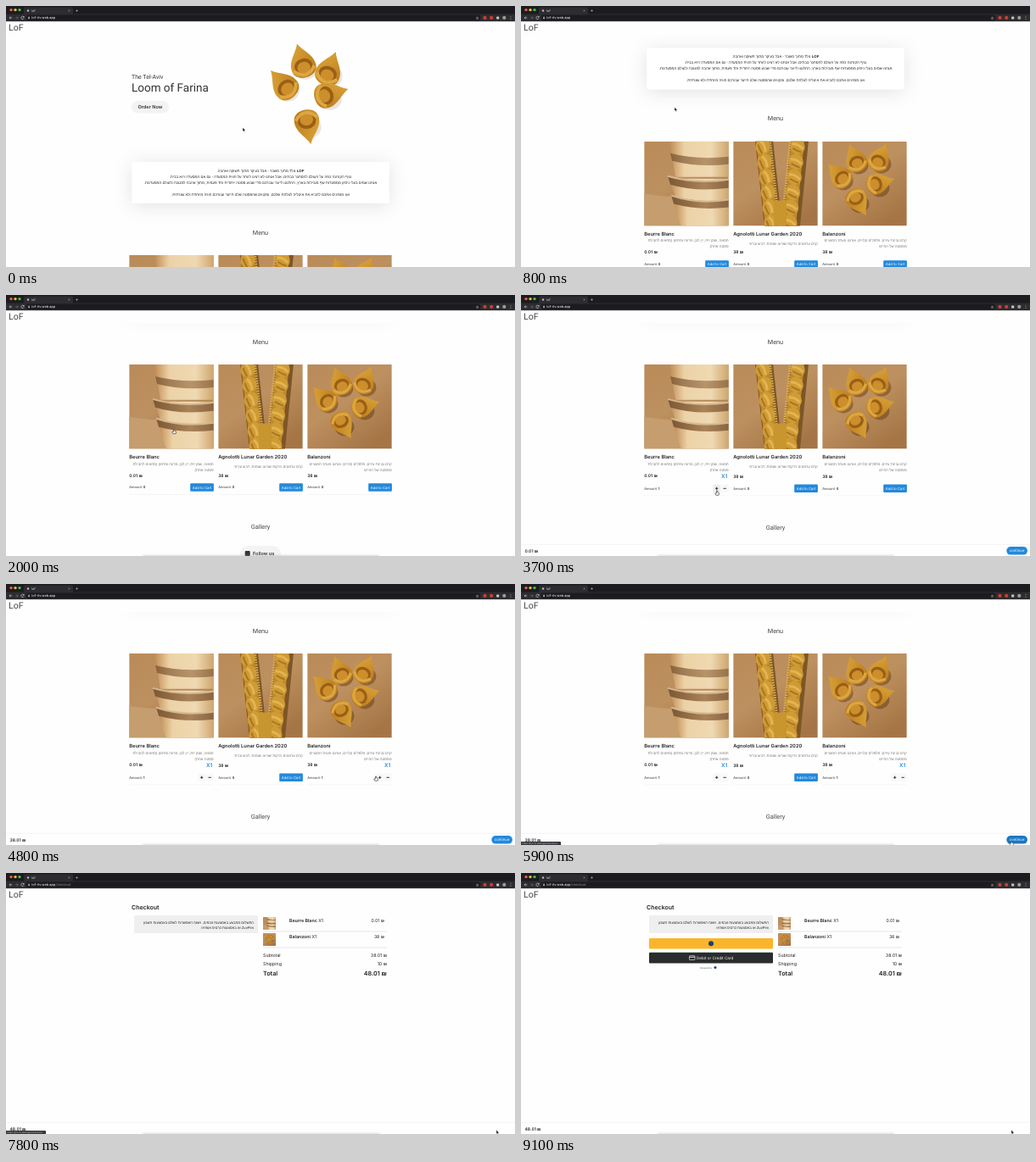
An HTML page that plays this animation: 600x308 px, repeating every 9200 ms.

```html
<!DOCTYPE html>
<html lang="en">
<head>
<meta charset="utf-8">
<title>lof</title>
<style>
html, body { margin: 0; width: 100%; height: 100%; overflow: hidden; background: #fefefe; }
svg { display: block; }
text { font-family: Inter, "Liberation Sans", sans-serif; fill: #222; white-space: pre; text-rendering: geometricPrecision; }
.r { font-family: Roboto, sans-serif; }
.b { font-weight: 600; }
.w { fill: #fff; }
.g { fill: #777; }
.m { text-anchor: middle; }
.e { text-anchor: end; }
.h { font-family: "Liberation Sans", sans-serif; direction: rtl; }
</style>
</head>
<body>
<svg id="stage" width="600" height="308" viewBox="0 0 600 308">
  <defs>
    <linearGradient id="wood" x2=".7" y2="1"><stop stop-color="#b98b58"/><stop offset=".5" stop-color="#bd9060"/><stop offset="1" stop-color="#a57545"/></linearGradient>
    <linearGradient id="cream"><stop stop-color="#c08c54"/><stop offset=".25" stop-color="#ecd2a6"/><stop offset=".7" stop-color="#efd9b2"/><stop offset="1" stop-color="#cfa56e"/></linearGradient>
    <linearGradient id="gap"><stop stop-color="#7d5734"/><stop offset=".6" stop-color="#a98258"/><stop offset="1" stop-color="#8a6540"/></linearGradient>
    <linearGradient id="dough" y2="1"><stop stop-color="#e0aa3f"/><stop offset="1" stop-color="#b87818"/></linearGradient>
    <filter id="soft" x="-20%" y="-80%" width="140%" height="300%"><feDropShadow dx="0" dy="3" stdDeviation="11" flood-opacity=".11"/></filter>
    <filter id="blur" x="-5%" y="-200%" width="110%" height="500%"><feGaussianBlur stdDeviation="1.2"/></filter>
    <g id="piece">
      <path d="M0-26C4-16 16-8 15 4C15 12 8 16 0 16C-8 16-15 12-15 4C-16-8-4-16 0-26Z" fill="url(#dough)"/>
      <ellipse cy="2" rx="11" ry="9" fill="#9a5f16"/>
      <ellipse cy="4" rx="8" ry="7" fill="#cd8f2c"/>
      <path d="M-13 5Q0 20 13 5" fill="none" stroke="#dca742" stroke-width="4"/>
    </g>
    <g id="dish"></g>
    <symbol id="tubs" viewBox="0 0 100 100">
      <rect width="100" height="100" fill="url(#wood)"/>
      <path d="M0 62Q50 70 100 62V100H0Z" fill="#c59d6e"/>
      <path d="M30 0H100V42H37Z" fill="url(#cream)"/>
      <path d="M31 14Q62 22 100 18V27Q64 31 33 23Z" fill="url(#gap)" opacity=".8"/>
      <path d="M30 44H100V72Q62 76 37 66Z" fill="url(#cream)"/>
      <path d="M35 70H100V100H44Q38 88 35 70Z" fill="url(#cream)"/>
      <path d="M28 41Q60 50 100 46V55Q60 60 31 51Z" fill="url(#gap)"/>
      <path d="M28 41Q62 51 100 45" fill="none" stroke="#d3b891" stroke-width="2"/>
      <path d="M32 64Q64 74 100 69V78Q64 82 35 74Z" fill="url(#gap)"/>
      <path d="M32 64Q64 75 100 69" fill="none" stroke="#d3b891" stroke-width="2"/>
    </symbol>
    <symbol id="strips" viewBox="0 0 100 100"></symbol>
    <symbol id="plate" viewBox="0 0 100 100"></symbol>
  </defs>
  <rect width="600" height="308" fill="#fefefe"/>
  <g id="shop"></g>
  <g id="checkout"></g>
  <g id="bar"></g>
  <rect id="dock" x="161" y="307" width="279" height="4" fill="#999" filter="url(#blur)"/>
  <g id="status"></g>
  <g id="chrome"></g>
  <g id="arrow"><path d="M0 0V4.6L1.1 3.6L1.9 5.3L2.6 5L1.9 3.4H3.3Z" fill="#111" stroke="#fff" stroke-width=".35"/></g>
  <g id="hand"><path d="M-.6 0Q0-.7.6 0V1.8L2.3 2.3Q2.8 3 2.1 5.2H-1.2L-2.3 3Q-1.8 2.3-.6 3Z" fill="#fff" stroke="#222" stroke-width=".6"/></g>
</svg>
<script>
const LOOP = 9200, BLUE = '#2389dc';
const ADD_A = 3200, ADD_B = 4700, HOVER = 5700, PAGE = 6900, PAY = 8500;
const $ = id => document.getElementById(id);

// y is the vertical middle of the line
const text = (x, y, s, size, cls = '', fill = '') =>
  `<text x="${x}" y="${y + size * .36}" font-size="${size}" class="${cls}"${fill && ` style="fill:${fill}"`}>${s}</text>`;
const rect = (x, y, w, h, fill, rx = 0, more = '') =>
  `<rect x="${x}" y="${y}" width="${w}" height="${h}" rx="${rx}" fill="${fill}" ${more}/>`;
const dot = (x, y, r, fill) => `<circle cx="${x}" cy="${y}" r="${r}" fill="${fill}"/>`;
const line = (d, color, w = .7) => `<path d="${d}" fill="none" stroke="${color}" stroke-width="${w}"/>`;
const photo = (id, x, y, size) => `<use href="#${id}" x="${x}" y="${y}" width="${size}" height="${size}"/>`;
const smooth = u => (u = Math.min(1, Math.max(0, u)), u * u * (3 - 2 * u));

// Redraw a group only when its markup changes
const last = {};
function put(id, html) {
  if (last[id] !== html) $(id).innerHTML = last[id] = html;
}

// Pasta pieces: x, y, angle
const pieces = (list, size, shade) => list.map(([x, y, a]) =>
  `<ellipse cx="${x + 3}" cy="${y + 5}" rx="${14 * size}" ry="${13 * size}" fill="#5a330c" opacity="${shade}"/>` +
  `<use href="#piece" transform="translate(${x} ${y}) rotate(${a}) scale(${size})"/>`).join('');
put('dish', pieces([[350, 69, -16], [380, 78, 20], [329, 95, -42], [379, 105, 74], [355, 138, 170]], .98, .12));
put('plate', rect(0, 0, 100, 100, 'url(#wood)') +
  pieces([[40, 23, -22], [67, 22, 25], [22, 42, -45], [65, 50, 74], [41, 69, 150]], .82, .45));

function strip(x0, x1, side) {
  let s = line(`M${x0 + 2} -5L${x1 + 2} 105`, '#7d5626', 21) + line(`M${x0} -5L${x1} 105`, '#bd8a2a', 15) +
    `<path d="M${x0 + side * 9} -5L${x1 + side * 9} 105" stroke="#dcb050" stroke-width="3" stroke-dasharray="1.6 1.4"/>`;
  for (let i = 0; i < 6; i++) {
    const x = x0 + (x1 - x0) * (i + .5) / 6, y = 6 + i * 18;
    s += `<g transform="translate(${x} ${y}) rotate(${side * 20})"><ellipse rx="8.5" ry="9.5" fill="#cf9b35"/>` +
      line('M-5-5Q2-3 5 5', '#e2b552', 3) + line('M-6 0Q-2 5 2 8', '#a87522', 2) + '</g>';
  }
  return s;
}
put('strips', rect(0, 0, 100, 100, 'url(#wood)') + strip(34, 46, 1) + strip(77, 66, -1) +
  rect(48, 70, 15, 30, '#c8952f'));

const hero = `<g transform="translate(0 -212)">` +
  text(148, 83.5, 'The Tel-Aviv', 7, 'r', '#333') +
  text(148, 96.5, 'Loom of Farina', 13.5, 'r', '#333') +
  rect(148, 112, 44, 14.5, '#f3f3f3', 7.2) + text(170, 119.3, 'Order Now', 5.6, 'b m', '#333') +
  '<use href="#dish"/>' + rect(148.5, 184, 303, 48.5, '#fff', 2, 'filter="url(#soft)"') +
  [[194, '<tspan font-weight="700">LOF</tspan> נולד מתוך משבר - אבל בעיקר מתוך תשוקה ואהבה.'],
   [201, 'נגיף הקורונה כפה על העולם להסתגר בבתים, אבל אנחנו לא רצינו לוותר על חווית המסעדה - גם אם המסעדה היא בבית.'],
   [208, 'אנחנו שמים בעלי ניסיון ממסעדות שף מובילות בארץ, החלטנו לייצר עבורכם מדי שבוע פסטה ייחודית וחד פעמית, מתוך אהבה למטבח ולעולם המסעדנות.'],
   [222, 'אנו מזמינים אתכם להביא את איטליה לצלחת שלכם, ומקווים שהפסטה שלנו תייצר עבורכם חוויה מיוחדת ולא שגרתית.']]
    .map(([y, s]) => text(300, y, s, 4.35, 'h m')).join('') + '</g>';

const items = [
  ['tubs', 'Beurre Blanc', '0.01 ₪', ['חמאה, שמן זית, יין לבן, פרווה ופרמזן (מתאים לחבילת', 'פסטה אחת)']],
  ['strips', 'Agnolotti Lunar Garden 2020', '38 ₪', ['קרם ערמונים וירקות שורש, שומות, דבש וברוזי']],
  ['plate', 'Balanzoni', '38 ₪', ['קרם גבינת עיזים, פלפלים קלויים, אורגנו וזעתר חמוציים', 'מפסטה של החיים']]
];

function card([id, name, price, lines], i, added, grown, plusHover) {
  const x = 145.2 + i * 105, right = x + 99.5, y = grown ? 228.3 : 227;
  let s = photo(id, x, 82, 99.6) + text(x, 191.3, name, 5.8, 'b') +
    lines.map((l, k) => text(right, (lines.length > 1 ? 199 : 202.5) + k * 7, l, 4.3, 'h g')).join('') +
    text(x, grown && !added ? 214.5 : 212.8, price, 5, 'b') + line(`M${x} ${y + 8.5}H${right}`, '#f0f0f0', .6) +
    text(x, y, 'Amount:', 4, '', '#333') + text(x + 16.5, y, +added, 4, 'b');
  if (added) {
    s += text(right - 1.5, 213.8, 'X1', 6.3, 'b e', BLUE) +
      rect(right - 18.5, y - 4.5, 9, 9, plusHover ? '#eee' : '#f8f8f8', 1) + rect(right - 9, y - 4.5, 9, 9, '#f8f8f8', 1) +
      line(`M${right - 15.6} ${y}h3.2m-1.6-1.6v3.2M${right - 6.2} ${y}h3.4`, '#222', .9);
  } else {
    s += rect(right - 27.5, y - 4.7, 27.7, 9.4, BLUE, 1) + text(right - 13.6, y, 'Add to Cart', 4.2, 'm w');
  }
  return s;
}

const shop = (a, b, plusHover) => hero + text(300, 55, 'Menu', 7.3, 'r m', '#444') +
  items.map((it, i) => card(it, i, [a, false, b][i], a, plusHover && !i)).join('') +
  text(300, a ? 274.5 : 273, 'Gallery', 7.3, 'r m', '#444') +
  rect(276, 296, 48, 18, '#f3f3f3', 9) + rect(281.7, 302, 6, 6, '#333', 1) + text(291, 305, 'Follow us', 5.6, 'b', '#333');

const row = (y, label, value, size, cls = '') =>
  text(303, y, label, size, cls) + text(449, y, value, size, cls + ' e');
const thumb = (y, id, name, price) => photo(id, 303, y, 15) +
  text(334, y + 4.2, `<tspan font-weight="600">${name}</tspan> X1`, 5.3) +
  text(446, y + 4.2, price, 5.2, 'e') + line(`M303 ${y + 17}H449`, '#ccc', .5);

const checkout = pay => rect(0, 18, 600, 290, '#fefefe') + text(148, 40.5, 'Checkout', 7, 'b') +
  rect(151, 50, 146, 21, '#efefef', 1) +
  text(292, 58, 'התשלום מתבצע באמצעות זובפים, וישנה האפשרות לשלם באמצעות חשבון', 4.2, 'h') +
  text(292, 64.3, 'ZuvPim או באמצעות כרטיס אשראי.', 4.2, 'h') +
  thumb(52, 'tubs', 'Beurre Blanc', '0.01 ₪') + thumb(71, 'plate', 'Balanzoni', '38 ₪') +
  row(97.3, 'Subtotal', '38.01 ₪', 5.3) + row(107.2, 'Shipping', '10 ₪', 5.3) + row(118, 'Total', '48.01 ₪', 7.2, 'b') +
  (pay ? rect(151, 77, 146, 12.6, '#fbb52b', 1) + dot(224, 83.3, 3, '#1b3f80') +
    rect(151, 93.8, 146, 12.6, '#2b2c2e', 1) +
    rect(198.5, 97.7, 6.5, 4.8, 'none', .6, 'stroke="#fff" stroke-width=".6"') + line('M198.5 99.3h6.5', '#fff', .8) +
    text(207, 100.1, 'Debit or Credit Card', 4.6, 'w') +
    text(211, 111.6, 'Powered by', 2.5, '', '#555') + dot(229, 111.6, 1.5, '#1b3f80') : '');

const bar = (total, fade, hover) => rect(0, 294, 600, 14, '#fefefe') + line('M0 294.3H600', '#e9e9e9', .6) +
  text(4.5, 302, total, 5, 'b') +
  `<g opacity="${fade}">` + rect(572.3, 297, 24.7, 9.6, hover ? '#1b77c6' : BLUE, 4.8) +
  text(584.6, 301.8, 'continue', 4.3, 'm w') + '</g>';

const chrome = path => rect(0, 18, 600, 15.5, '#fefefe') + text(3, 25.5, 'LoF', 10.5, 'r', '#444') +
  rect(0, 0, 600, 10, '#1c1c20') + rect(0, 9.5, 600, 8.7, '#2c2c31') + rect(21, 1.5, 58, 9, '#2c2c31', 1.5) +
  dot(6, 4.6, 1.7, '#f25e57') + dot(11, 4.6, 1.7, '#f5bd2f') + dot(16, 4.6, 1.7, '#3fc74a') +
  dot(26, 5.5, 1.2, '#bbb') + text(30, 5.5, 'lof', 3.9, '', '#ddd') +
  line('M73.6 4.6l1.8 1.8m0-1.8l-1.8 1.8M82 5.5h3m-1.5-1.5v3', '#bbb', .5) +
  rect(23.5, 10.6, 536, 6.6, '#1c1c20', 3.3) +
  line('M7.3 13.9H4m1.5-1.5L4 13.9l1.5 1.5', '#ddd', .6) +
  line('M11 13.9h3.3m-1.5-1.5l1.5 1.5l-1.5 1.5', '#77787c', .6) +
  line('M21 13a1.7 1.7 0 1 0 .1 1.5M21.2 12v1.3h-1.3', '#ddd', .6) +
  rect(26, 13.4, 2, 1.7, '#aaa') + line('M26.4 13.4v-.5a.6.6 0 0 1 1.2 0v.5', '#aaa', .4) +
  text(30.3, 13.9, `lof-rlv.web.app<tspan style="fill:#8a8b8f">${path}</tspan>`, 3.9, '', '#fff') +
  text(555.5, 13.9, '☆', 4.5, 'm', '#bbb') + dot(564.5, 13.9, 2.1, '#d23c2e') + dot(572.2, 13.9, 2.1, '#d23c2e') +
  rect(578.2, 12.6, 3, 3, '#ccc', .6) + dot(587.3, 13.9, 2.1, '#a8998c') +
  [12.3, 13.9, 15.5].map(y => dot(595, y, .45, '#ccc')).join('');

put('status', rect(-1, 304, 48, 5, '#37383c', 1) + text(1.5, 306.2, 'https://lof-rlv.web.app/checkout', 2.7, '', '#ccc'));

// Pointer stops: time, x, y
const stops = [[0, 279, 143.5], [150, 279, 143.5], [700, 181, 119.5], [1000, 181, 119.5], [1700, 198, 158.5],
  [2100, 198, 158.5], [2800, 231, 226], [3200, 231, 226], [3500, 231, 231], [3900, 231, 231],
  [4500, 436, 227], [4900, 436, 227], [5700, 578, 303.3], [LOOP, 578, 303.3]];

function draw(t) {
  const scroll = 212 * smooth((t - 300) / 850);
  const paid = t >= PAGE;
  put('shop', shop(t >= ADD_A, t >= ADD_B, t >= ADD_A && t < 4000));
  $('shop').setAttribute('transform', `translate(0 ${212 - scroll})`);
  put('checkout', paid ? checkout(t >= PAY) : '');
  const total = t >= PAGE + 200 ? '48.01 ₪' : t >= ADD_B ? '38.01 ₪' : '0.01 ₪';
  const fade = 1 - smooth((t - PAGE) / 300);
  put('bar', t >= ADD_A + 100 ? bar(total, fade.toFixed(2), t >= HOVER) : '');
  put('chrome', chrome(paid ? '/checkout' : ''));
  $('dock').style.opacity = t > 1300 ? .35 : 0;
  $('status').style.opacity = t >= HOVER + 100 && t < PAY ? 1 : 0;

  const i = Math.max(1, stops.findIndex(s => s[0] > t)), [t0, x0, y0] = stops[i - 1], [t1, x1, y1] = stops[i];
  const u = smooth((t - t0) / (t1 - t0));
  const onLink = t > 1500 && t < 2300 || t > 2650 && t < 4050 || t > 4400 && t < 5000 || t > 5600 && !paid;
  for (const id of ['arrow', 'hand']) {
    $(id).setAttribute('transform', `translate(${x0 + (x1 - x0) * u} ${y0 + (y1 - y0) * u})`);
    $(id).style.opacity = (id === 'hand') === onLink ? 1 : 0;
  }
}

const start = performance.now();
function tick() {
  draw((performance.now() - start) % LOOP);
  requestAnimationFrame(tick);
}
tick();
</script>
</body>
</html>
```
